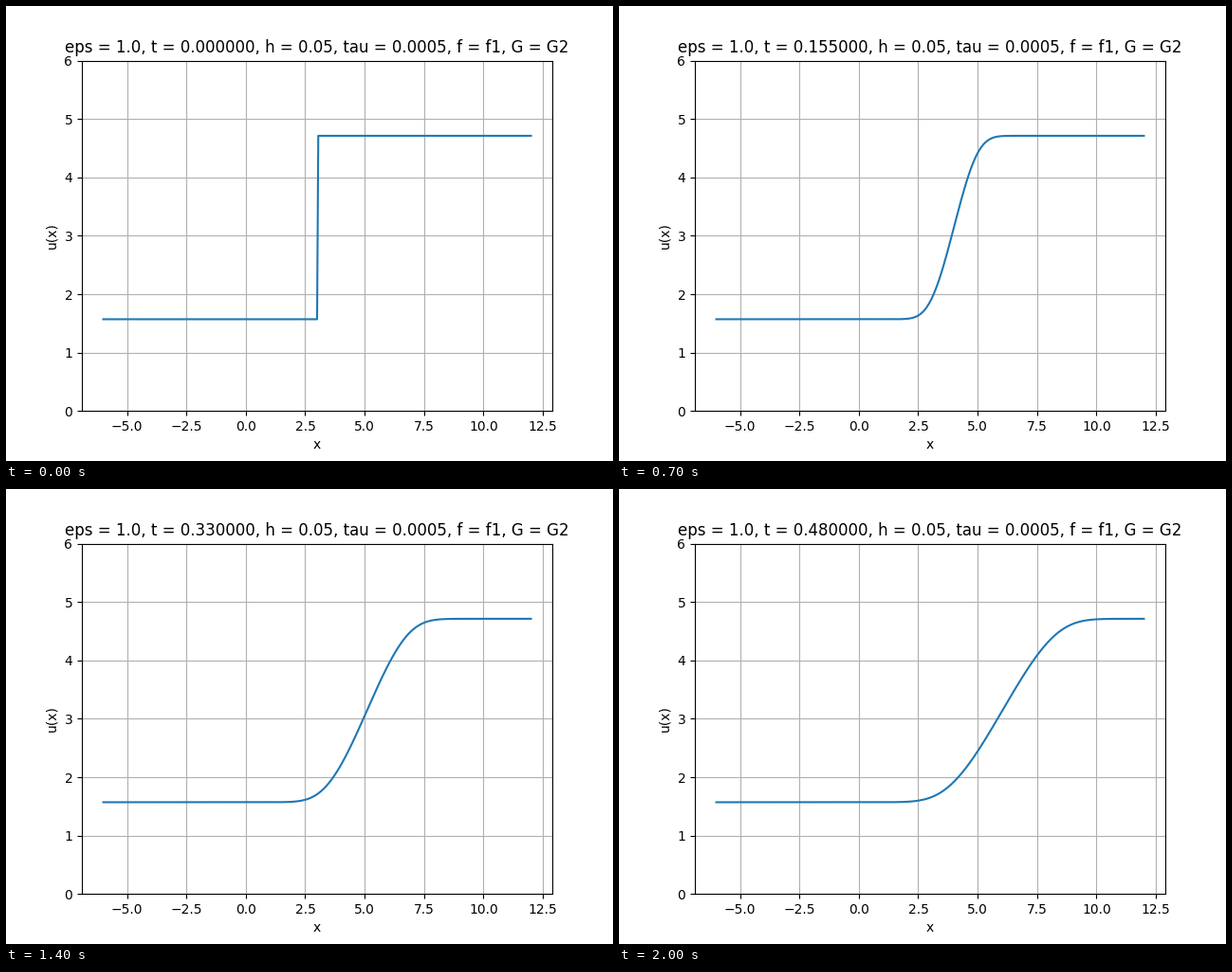
A matplotlib script for the animation above (2100 ms loop, 640 px wide and 480 px high).

```python
import numpy as np
import matplotlib.pyplot as plt
from matplotlib.animation import FuncAnimation

EPS, H, TAU = 1.0, 0.05, 0.0005
FRAMES, INTERVAL = 21, 100
FIRST, STRIDE = 10, 50  # time steps before the second frame, then per frame

x = np.linspace(-6, 12, 361)


def advance(u, steps):
    """Explicit central scheme for u_t + (u^2)_x = eps * u_xx."""
    u = u.copy()
    for _ in range(steps):
        flux = u ** 2
        advection = (flux[2:] - flux[:-2]) / (2 * H)
        diffusion = EPS * (u[2:] - 2 * u[1:-1] + u[:-2]) / H ** 2
        u[1:-1] += TAU * (diffusion - advection)
    return u


def step_count(i):
    return 0 if i == 0 else FIRST + STRIDE * (i - 1)


states = [np.where(x < 3 + H / 2, np.pi / 2, 3 * np.pi / 2)]
for i in range(1, FRAMES):
    states.append(advance(states[-1], step_count(i) - step_count(i - 1)))

fig, ax = plt.subplots(figsize=(6.4, 4.8), dpi=100)
line, = ax.plot(x, states[0])
ax.set_xlim(-6.9, 12.9)
ax.set_ylim(0, 6)
ax.set_xlabel("x")
ax.set_ylabel("u(x)")
ax.grid(True)


def draw(i):
    line.set_ydata(states[i])
    t = step_count(i) * TAU
    ax.set_title(f"eps = {EPS}, t = {t:.6f}, h = {H}, tau = {TAU}, f = f1, G = G2")
    return line, ax.title


anim = FuncAnimation(fig, draw, frames=FRAMES, interval=INTERVAL,
                     repeat=True, repeat_delay=0)
plt.show()
```
